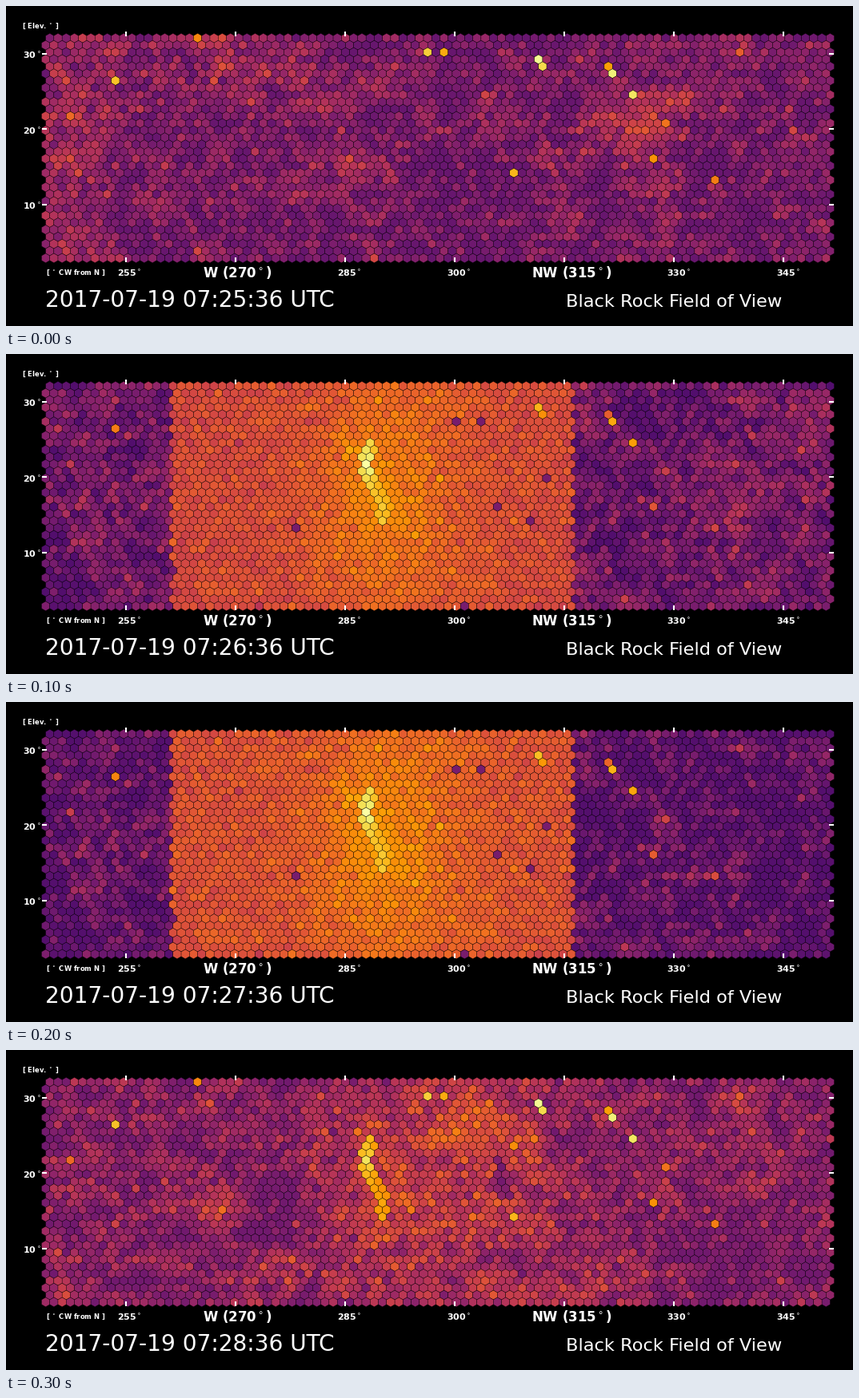
A matplotlib script that plays this animation: 1059x401 px, repeating every 0.4 s.

```python
import numpy as np
import matplotlib.pyplot as plt
from matplotlib.animation import FuncAnimation
from matplotlib.collections import PolyCollection

W, H, DPI = 1059, 401, 100
COLS, ROWS = 96, 32
PITCH = 10.27
ROW_STEP = PITCH * np.sqrt(3) / 2
LEFT, TOP = 49.6, 40.2
BAND = (207, 707)
DEGREE = r"$^\circ$"

plt.rcParams["font.family"] = "DejaVu Sans"

row, col = np.mgrid[:ROWS, :COLS]
X = LEFT + PITCH * (col + 0.5 * (row % 2 == 0))
Y = TOP + ROW_STEP * row
IN_BAND = (X > BAND[0]) & (X < BAND[1])

# Steady bright points, hottest first.
BEACONS = [(666, 67), (758, 84), (784, 111), (671, 75), (527, 58), (137, 93),
           (635, 209), (547, 58), (753, 75), (809, 191), (239, 40), (887, 218),
           (820, 147), (80, 138), (918, 58)]
# The lightning channel runs through these points.
CHANNEL = [(455, 111), (450, 138), (458, 165), (469, 182), (471, 209)]


def patchy_noise(rng):
    noise = rng.normal(size=X.shape)
    for _ in range(2):
        noise = sum(np.roll(noise, s, a) for s, a in
                    [(0, 0), (1, 0), (-1, 0), (1, 1), (-1, 1)]) / 5
    return noise / noise.std()


def hill(x, y, sx, sy, height):
    return height * np.exp(-(((X - x) / sx) ** 2 + ((Y - y) / sy) ** 2))


def channel(strength):
    xs, ys = np.transpose(CHANNEL)
    offset = np.abs(X - np.interp(Y, ys, xs))
    inside = (Y > ys[0] - 4) & (Y < ys[-1] + 4) & (offset < 0.8 * PITCH)
    heat = 0.88 - 0.008 * offset + hill(450, 138, 12, 22, 0.13)
    return np.where(inside, strength * heat, 0)


def sky(seed, base, floor, hills, dim=0.0, strike=0.0, flash=None):
    rng = np.random.default_rng(seed)
    level = base + sum(hill(*h) for h in hills)
    level += 0.035 * patchy_noise(rng) + 0.055 * rng.normal(size=X.shape)
    level = np.maximum(level, floor)
    if flash:
        glow = flash + hill(465, 170, 70, 95, 0.09) + hill(490, 180, 120, 400, 0.07)
        glow = np.minimum(glow + 0.03 * rng.normal(size=X.shape), 0.8)
        dead = rng.random(X.shape) < 0.006
        level = np.where(IN_BAND, np.where(dead, 0.33, glow), level)
    for (x, y), heat in zip(BEACONS, np.linspace(0.98, 0.64, len(BEACONS))):
        nearest = np.argmin((X - x) ** 2 + (Y - y) ** 2)
        level.flat[nearest] = max(level.flat[nearest], heat - dim)
    return np.maximum(level, channel(strike)).ravel()


SKIES = [
    sky(3, 0.35, 0.29, [
        (75, 180, 60, 190, 0.09), (255, 45, 45, 14, 0.13), (330, 95, 140, 40, 0.07),
        (450, 200, 28, 25, 0.15), (785, 140, 45, 45, 0.2), (850, 115, 25, 18, 0.15),
        (820, 240, 18, 40, 0.1), (540, 240, 90, 80, -0.06)]),
    sky(8, 0.34, 0.24, [
        (820, 70, 70, 45, -0.08), (770, 240, 60, 60, -0.07), (60, 300, 40, 40, -0.07),
        (950, 150, 80, 70, 0.05)], dim=0.15, strike=1, flash=0.585),
    sky(8, 0.27, 0.245, [
        (130, 180, 90, 150, 0.05), (850, 300, 55, 18, 0.1), (855, 218, 40, 8, 0.14),
        (815, 160, 18, 35, 0.1)], dim=0.13, strike=1, flash=0.605),
    sky(5, 0.385, 0.315, [
        (540, 150, 150, 210, 0.15), (470, 180, 28, 45, 0.11), (610, 105, 60, 35, 0.07),
        (270, 195, 25, 25, 0.14), (740, 285, 70, 50, 0.09), (930, 75, 35, 40, 0.07),
        (330, 210, 40, 70, -0.09), (715, 120, 35, 30, -0.11),
        (920, 275, 50, 50, -0.07)], strike=0.92),
]

fig = plt.figure(figsize=((W + 1e-6) / DPI, (H + 1e-6) / DPI), dpi=DPI,
                 facecolor="black")
ax = fig.add_axes([0, 0, 1, 1])
ax.set(xlim=(0, W), ylim=(H, 0))
ax.axis("off")

angles = np.radians(np.arange(30, 390, 60))
hexagon = PITCH / np.sqrt(3) * np.column_stack([np.cos(angles), np.sin(angles)])
centres = np.column_stack([X.ravel(), Y.ravel()])
cells = PolyCollection(centres[:, None] + hexagon, cmap="inferno",
                       edgecolors="black", linewidths=0.25)
cells.set_clim(0, 1)
cells.set_array(SKIES[0])
ax.add_collection(cells, autolim=False)


def label(x, y, text, size, weight="bold", **kw):
    return ax.text(x, y, text, size=size, weight=weight, color="white",
                   va="baseline", **kw)


def tick(xs, ys):
    ax.plot(xs, ys, color="white", lw=1.5, solid_capstyle="butt")


for i in range(7):
    x = 150 + 137 * i
    tick([x, x], [32, 38])
    tick([x, x], [315, 321])
    if i not in (1, 4):
        label(139.4 + 137.25 * i, 339, f"{255 + 15 * i}{DEGREE}", 8)
for i in range(3):
    y = 60 + 94.5 * i
    tick([45, 51], [y, y])
    tick([1029, 1035], [y, y])
    label(20.5, y + 6, f"{30 - 10 * i}{DEGREE}", 8)

label(245.7, 340, f"W (270{DEGREE})", 12)
label(656.7, 340, f"NW (315{DEGREE})", 12)
label(19.6, 28, f"[ Elev. {DEGREE} ]", 6)
label(49.6, 337, f"[ {DEGREE} CW from N ]", 6)
label(835, 377, "Black Rock Field of View", 16.2, "normal", ha="center")
clock = label(230, 377, "", 20.15, "normal", ha="center")


def update(i):
    cells.set_array(SKIES[i])
    clock.set_text(f"2017-07-19 07:{25 + i}:36 UTC")
    return cells, clock


anim = FuncAnimation(fig, update, frames=4, interval=100, repeat=True,
                     repeat_delay=0, blit=False)
plt.show()
```
